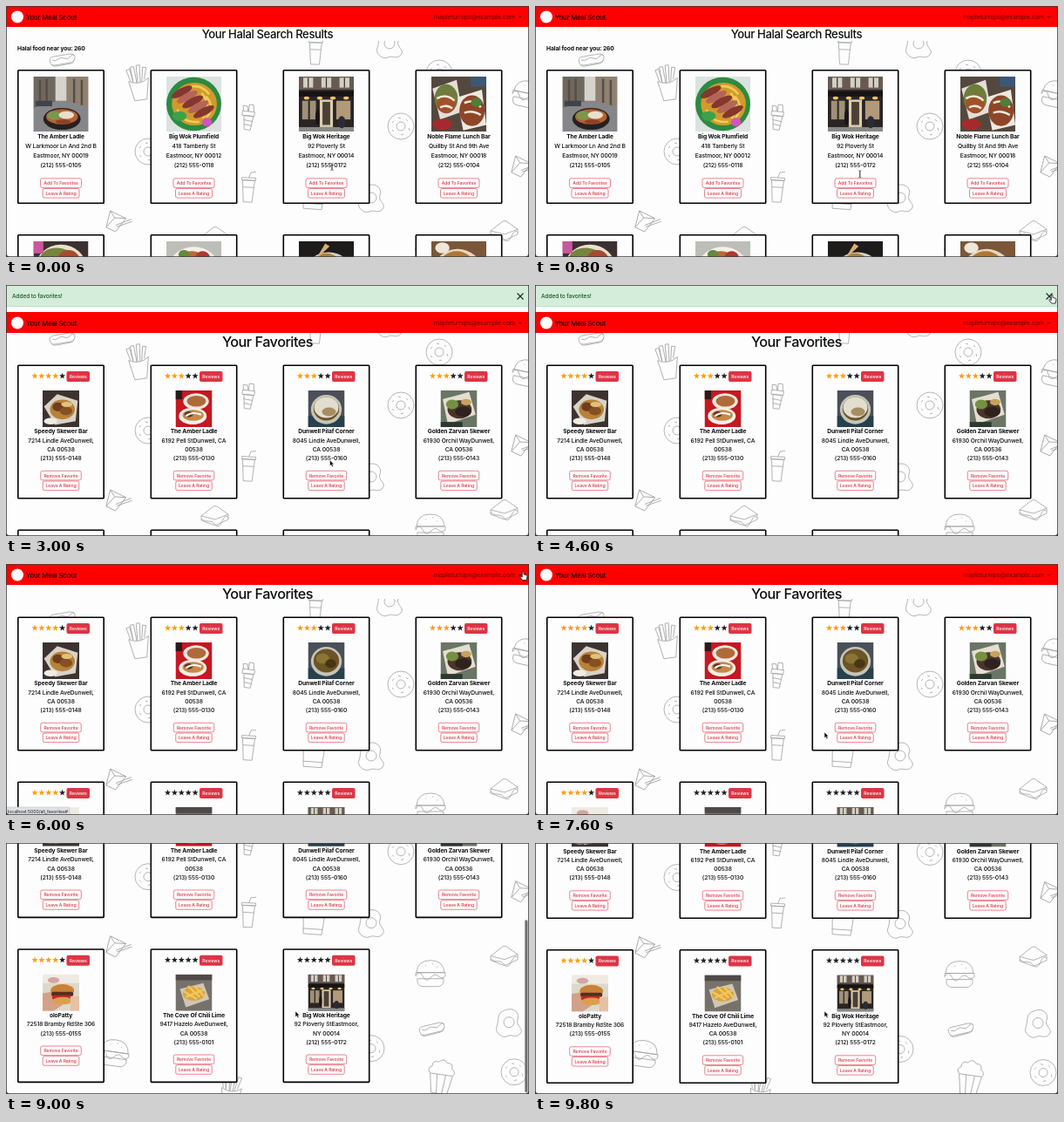
Recreate the animation shown at these times as an HTML page. Size 600 px wide and 288 px high, loop 9.9 s.

```html
<!DOCTYPE html>
<html lang="en">
<head>
<meta charset="utf-8">
<title>Restaurant favorites</title>
<style>
html, body { margin: 0; width: 100%; height: 100%; overflow: hidden; background: #fff; }
svg { display: block; }
#stage { width: 600px; height: 288px; font-family: Inter, "Liberation Sans", sans-serif; }
text { letter-spacing: -.018em; }
.heading { letter-spacing: -.03em; }
</style>
</head>
<body>
<svg id="stage" viewBox="0 0 600 288" xmlns="http://www.w3.org/2000/svg"></svg>
<script>
const LOOP = 9900, STEP = 100;
const RED = '#dc3545', INK = '#0c0e10', PAPER = '#fdfdfd';
const COLS = [13, 165.5, 317.5, 469.5];
const CARD_W = 100, CARD_H = 154, ROW = 189;

// Drawing helpers
const rect = (x, y, w, h, fill, more = '') =>
  `<rect x="${x}" y="${y}" width="${w}" height="${h}" fill="${fill}" ${more}/>`;
const oval = (x, y, rx, ry, fill, more = '') =>
  `<ellipse cx="${x}" cy="${y}" rx="${rx}" ry="${ry}" fill="${fill}" ${more}/>`;
const path = (d, fill, more = '') => `<path d="${d}" fill="${fill}" ${more}/>`;
const group = (x, y, body) => `<g transform="translate(${x} ${y})">${body}</g>`;
const text = (x, y, str, size, { weight = 450, fill = INK, anchor = 'middle', cls = '' } = {}) =>
  `<text class="${cls}" x="${x}" y="${y + size * .36}" font-size="${size}" font-weight="${weight}" fill="${fill}" text-anchor="${anchor}">${str}</text>`;

// Line-art background
const ART = {
  hotdog: 'M-14 3q-3-6 4-7l18-3q7 0 6 5t-5 5l-18 3q-5 0-5-3zM-12 0q4 2 7-1t7-1 7-2 5-1M-13 5q1 3 6 2l16-3q4-1 4-4',
  fries: 'M-11-3l4 23h14l5-24q-11 8-23 1zM-9-3l-3-13 4-1 2 15M-6-1l-1-18h4l1 19M-1 0l1-20h4l-2 20M4-1l3-16 4 1-4 13',
  sundae: 'M-5 1l2 16h7l2-16zM-7-4h14v5h-14zM-6-4l-1-6h5l1 6M0-4v-8h5l1 8M-5 6l10 1M-4 11l9 1',
  drink: 'M-7-9l2 25h10l2-25zM-8-12h16v3h-16zM0-12l2-6 6-1M-6-1h12',
  cup: 'M-13-18l2 32h21l3-32zM-12 8h23',
  donut: 'M-15 0a15 15 0 1 0 30 0a15 15 0 1 0-30 0M-5 0a5 5 0 1 0 10 0a5 5 0 1 0-10 0M-10-4l2-2M-3-10l3 1M6-8l2 2M9 2l1 3M3 9l-3 1M-8 6l-2-2',
  egg: 'M-4-15c10-4 17 4 14 11s8 10 3 16-10 0-15 3-15-4-12-11-1-16 10-19zM-6-1a6 6 0 1 0 12 0a6 6 0 1 0-12 0',
  box: 'M-11-8h20l-4 19h-12zM-11-8l8 5 12-5M-3-3l-4 14M2 4l13-14M4 5l13-13',
  sandwich: 'M-16 0l14-11q2-1 4 0l13 9-15 6zM-16 0v5l16 6 15-7v-6M-16 3q4 4 8 3t8 4 8-4 7-4',
  burger: 'M-16-2q1-14 16-14t16 14zM-17-2h34v4q-4 4-8 0t-9 2-9-2-8 0zM-15 5h30v4q-2 5-7 5h-16q-6 0-7-5zM-6-10h1M2-12h1M7-8h1',
  popcorn: 'M-13-4l4 22h18l4-22zM-5-4l2 22M5-4l-2 22M-13-4q-5-6 1-8 0-8 7-6 5-6 10 0 7-1 6 6 6 4 2 8'
};
const DOODLES = [
  ['hotdog', 65, 62], ['fries', 152, 88, -8], ['sundae', 278, 125, 6], ['drink', 278, 209, 3],
  ['donut', 453, 138], ['donut', 163, 167], ['egg', 419, 221], ['box', 126, 247, 26],
  ['sandwich', 240, 265], ['sandwich', 572, 258], ['burger', 487, 279], ['cup', 353, 219, 4],
  ['drink', 355, 51, 2], ['egg', 440, 44], ['donut', 497, 77], ['burger', 598, 102, 12],
  ['box', 591, 184, 26], ['hotdog', 489, 342, -4], ['burger', 124, 370, 8], ['egg', 577, 335],
  ['popcorn', 499, 398, 8], ['fries', 258, 413, 6], ['donut', 419, 364], ['donut', 583, 391]
];
const doodles = '<g fill="none" stroke="#a2a2a2" stroke-width=".8" clip-path="url(#below)">' +
  DOODLES.map(([k, x, y, a = 0]) =>
    `<path d="${ART[k]}" transform="translate(${x} ${y}) rotate(${a})"/>`).join('') + '</g>';

// Simplified pictures on a 100 x 100 square
const PICS = {
  street: rect(0, 0, 100, 100, '#8a857f') + rect(38, 0, 24, 44, '#d6d3ce') +
    path('M0 0h40v46L0 58z', '#6f685f') + path('M60 0h40v58L60 46z', '#8f8272') +
    path('M12 6v44M24 4v44M74 4v44M88 6v46', 'none', 'stroke="#574f47" stroke-width="4"') +
    path('M0 57l36-11h30l34 12v42H0z', '#85868a') + rect(4, 44, 30, 10, '#40444a') +
    oval(52, 77, 34, 20, '#272021') + oval(52, 73, 29, 14, '#b8622f') +
    oval(38, 71, 13, 8, '#7c9650') + oval(60, 70, 14, 7, '#eadfcb') + oval(54, 82, 14, 4, '#8f3f28'),
  steak: rect(0, 0, 100, 100, '#dbe2df') + oval(50, 50, 50, 49, '#2c8a42') + oval(51, 50, 41, 39, '#d29a2c') +
    path('M30 24q30-16 48 8M20 60q10 26 40 22M72 36q18 20 0 40M64 30q20 24 2 46', 'none', 'stroke="#f0cb57" stroke-width="4"') +
    [0, 1, 2, 3, 4].map(i => oval(28 + i * 10, 28 + i * 9, 21, 7, i % 2 ? '#b5645a' : '#83372f', `transform="rotate(-28 ${28 + i * 10} ${28 + i * 9})"`)).join('') +
    oval(24, 72, 13, 9, '#3fa04c') + oval(74, 83, 9, 8, '#d454bd'),
  shop: rect(0, 0, 100, 100, '#2a2423') + rect(0, 0, 100, 24, '#685a50') +
    [8, 41, 74].map(x => rect(x, 2, 18, 18, '#d2cfc4') + rect(x + 8, 2, 2, 18, '#39302c')).join('') +
    rect(0, 27, 100, 9, '#171416') + [14, 38, 62, 86].map(x => oval(x, 39, 5, 3, '#f3c36c')).join('') +
    rect(6, 44, 25, 34, '#a09078') + rect(68, 44, 26, 34, '#b09a7a') + rect(38, 42, 24, 50, '#dccdb0') +
    rect(43, 46, 14, 42, '#4c4036') + rect(0, 92, 100, 8, '#8b8987') + oval(78, 83, 7, 11, '#292c35') +
    rect(17, 44, 3, 34, '#2a2423') + oval(34, 74, 4, 15, '#181618'),
  trays: rect(0, 0, 100, 100, '#54483e') + path('M2 22l44-16 10 58-40 14z', '#e4ded6') + path('M46 38l46-14 8 64-42 10z', '#eee9e2') +
    oval(27, 40, 21, 26, '#6d7d3c') + oval(74, 62, 23, 28, '#8f4528') + oval(27, 50, 17, 17, '#a2502c') +
    path('M10 40q18-10 32 4M60 48q18-8 30 8M60 66q14-6 30 4M16 56q12-6 22 2', 'none', 'stroke="#f7ead9" stroke-width="4"') +
    oval(82, 47, 10, 8, '#4f7f36') + oval(20, 87, 18, 10, '#a52a2b') + rect(72, 0, 28, 18, '#3b5878'),
  salad: rect(0, 0, 100, 100, '#3d3130') + oval(50, 48, 46, 42, '#e8e1d0') + oval(42, 32, 30, 20, '#77843c') + oval(64, 40, 22, 24, '#a84a30') + rect(0, 0, 18, 22, '#c9579f'),
  wrap: rect(0, 0, 100, 100, '#bdbeb8') + oval(50, 50, 46, 40, '#f3f0ea') + oval(46, 36, 24, 18, '#b96a35') + oval(66, 30, 13, 12, '#b23630') + oval(32, 24, 10, 8, '#66883c'),
  bread: rect(0, 0, 100, 100, '#1d1c1a') + oval(54, 56, 42, 36, '#d3d3c8') + oval(50, 48, 28, 26, '#b37d38') + path('M30 34L48 4l8 5z', '#dcae70'),
  platter: rect(0, 0, 100, 100, '#7b5638') + oval(48, 52, 43, 38, '#e5d8c2') + oval(46, 42, 30, 24, '#b07632') + oval(20, 12, 13, 10, '#eee6d8'),
  foam: rect(0, 0, 100, 100, '#3c3330') + path('M4 44L40 10l56 18-6 56-56 10z', '#d9d2c7') + oval(54, 52, 34, 27, '#b78138') +
    oval(42, 45, 15, 12, '#713d1c') + oval(64, 56, 17, 12, '#855024') + oval(66, 38, 15, 7, '#e1c27b') + oval(22, 84, 18, 9, '#f0ece4'),
  feast: rect(0, 0, 100, 100, '#c51820') + oval(56, 30, 35, 22, '#efe6de') + oval(57, 29, 26, 15, '#ad6b3a') +
    oval(47, 70, 38, 23, '#f3eee7') + oval(48, 68, 29, 15, '#c48a48') + oval(36, 65, 12, 8, '#6d3525') +
    path('M28 70q18-14 42-4', 'none', 'stroke="#fff" stroke-width="5"') + rect(0, 0, 18, 24, '#271b1c'),
  curry: rect(0, 0, 100, 100, '#4a5058') + rect(0, 70, 100, 30, '#27414d') + oval(50, 52, 42, 40, '#c6c4b7') +
    oval(50, 50, 35, 32, '#6b5426') + oval(40, 44, 18, 14, '#8b7434') + oval(62, 58, 15, 12, '#473515'),
  grill: rect(0, 0, 100, 100, '#6b7565') + path('M6 24L78 4l18 62-76 26z', '#e3ded2') + oval(52, 52, 33, 25, '#49352c') +
    oval(32, 38, 17, 13, '#75903f') + oval(62, 58, 22, 14, '#2f211d') + oval(70, 32, 14, 9, '#c7a25c') + rect(0, 86, 60, 14, '#2d3830'),
  patty: rect(0, 0, 100, 100, '#ddd8c8') + rect(0, 0, 100, 24, '#efebe3') + oval(30, 16, 16, 8, '#d5a4a0') +
    path('M0 52l34-6 22 36-26 18H0z', '#d2a187') + oval(54, 44, 32, 17, '#c98237') + rect(24, 48, 60, 12, '#51301f', 'rx="5"') +
    rect(26, 57, 56, 12, '#c3252a', 'rx="5"') + oval(55, 72, 28, 10, '#dc9f4b') + rect(76, 60, 24, 40, '#e6c0a4'),
  chips: rect(0, 0, 100, 100, '#77716c') + path('M12 40l64-16 16 44-64 22z', '#cfc6b4') + oval(50, 53, 30, 19, '#dca23b') +
    path('M22 46l36 22M34 32l32 30M28 62l48-20M52 32l26 28', 'none', 'stroke="#f0c65f" stroke-width="6"') + rect(0, 0, 100, 16, '#4f4a47')
};
const pic = (kind, x, y, size) =>
  `<svg x="${x}" y="${y}" width="${size}" height="${size}" viewBox="0 0 100 100">${PICS[kind]}</svg>`;

// Page parts
const outlineBtn = (x, y, w, label, id = '') =>
  rect(x - w / 2, y, w, 10.6, PAPER, `rx="2" stroke="${RED}" stroke-width=".6"`) +
  `<g ${id}>${text(x, y + 5.5, label, 5.1, { fill: RED })}</g>`;
const frame = () => rect(.8, .8, CARD_W - 1.6, CARD_H - 1.6, PAPER, 'rx=".8" stroke="#000" stroke-width="1.6"');

const nav = () => rect(0, 0, 600, 24, '#f00') + oval(13, 12.5, 7, 7, '#fff') +
  text(23, 13, 'Your Meal Scout', 7.7, { anchor: 'start', fill: '#1a0000' }) +
  text(584, 12.8, 'mapleturnips@example.com', 7.05, { anchor: 'end', fill: '#7d0000' }) +
  path('M587.5 11.7h4.4l-2.2 2.4z', '#7d0000');

function resultCard([name, street, city, phone, kind], i) {
  const mid = CARD_W / 2;
  return group(COLS[i % 4], 73 + ROW * (i > 3), frame() + pic(kind, 18.5, 8, 63) +
    text(mid, 76.5, name, 6.7, { weight: 700 }) +
    [street, city, phone].map((s, n) => text(mid, 87.6 + n * 11, s, 6.75)).join('') +
    outlineBtn(mid, 124.8, 47, 'Add To Favorites', i === 2 ? 'id="add"' : '') +
    outlineBtn(mid, 136.5, 42, 'Leave A Rating'));
}

const star = (x, y, fill) => {
  const pts = Array.from({ length: 10 }, (_, i) => {
    const r = i % 2 ? 1.6 : 3.7, a = i * Math.PI / 5;
    return `${(x + r * Math.sin(a)).toFixed(2)},${(y - r * Math.cos(a)).toFixed(2)}`;
  });
  return `<polygon points="${pts.join(' ')}" fill="${fill}"/>`;
};

function favoriteCard([name, lines, kind, stars], i) {
  const mid = CARD_W / 2, btnY = 101 + (lines.length - 1) * 10;
  return group(COLS[i % 4], 60.5 + ROW * (i > 3), frame() +
    [0, 1, 2, 3, 4].map(n => star(20 + n * 7.9, 13, n < stars ? '#ff9d0a' : '#1d2024')).join('') +
    rect(56.5, 7.5, 26.5, 12, RED, 'rx="2"') + text(69.8, 13.6, 'Reviews', 5.2, { fill: '#fff' }) +
    pic(kind, 29, 29.5, 42) + (i === 2 ? `<g id="rice">${oval(50, 49, 14, 12, '#e2ddcf')}${oval(53, 54, 8, 5, '#a68d62')}</g>` : '') +
    text(mid, 76.5, name, 6.7, { weight: 700 }) +
    lines.map((s, n) => text(mid, 86.8 + n * 10.1, s, 6.75)).join('') +
    outlineBtn(mid, btnY + .8, 46.5, 'Remove Favorite') + outlineBtn(mid, btnY + 12.5, 41.5, 'Leave A Rating'));
}

const RESULTS = [
  ['The Amber Ladle', 'W Larkmoor Ln And 2nd B', 'Eastmoor, NY 00019', '(212) 555-0105', 'street'],
  ['Big Wok Plumfield', '418 Tamberly St', 'Eastmoor, NY 00012', '(212) 555-0118', 'steak'],
  ['Big Wok Heritage', '92 Ploverly St', 'Eastmoor, NY 00014', '(212) 555-0172', 'shop'],
  ['Noble Flame Lunch Bar', 'Quillby St And 9th Ave', 'Eastmoor, NY 00018', '(212) 555-0104', 'trays'],
  ['', '', '', '', 'salad'], ['', '', '', '', 'wrap'], ['', '', '', '', 'bread'], ['', '', '', '', 'platter']
];
const FAVORITES = [
  ['Speedy Skewer Bar', ['7214 Lindle AveDunwell,', 'CA 00538', '(213) 555-0148'], 'foam', 4],
  ['The Amber Ladle', ['6192 Pell StDunwell, CA', '00538', '(213) 555-0130'], 'feast', 3],
  ['Dunwell Pilaf Corner', ['8045 Lindle AveDunwell,', 'CA 00538', '(213) 555-0160'], 'curry', 3],
  ['Golden Zarvan Skewer', ['61930 Orchil WayDunwell,', 'CA 00536', '(213) 555-0143'], 'grill', 3],
  ['oloPatty', ['72518 Bramby RdSte 306', '(213) 555-0155'], 'patty', 4],
  ['The Cove Of Chili Lime', ['9417 Hazelo AveDunwell,', 'CA 00538', '(213) 555-0101'], 'chips', 0],
  ['Big Wok Heritage', ['92 Ploverly StEastmoor,', 'NY 00014', '(212) 555-0172'], 'shop', 0]
];

const results = doodles + nav() +
  text(300, 32.3, 'Your Halal Search Results', 13.1, { weight: 500, cls: 'heading' }) +
  text(13, 48.3, 'Halal food near you: 260', 6.75, { weight: 700, anchor: 'start' }) +
  RESULTS.map(resultCard).join('');

const alertBar = rect(0, 0, 600, 24.5, '#d4edda', 'stroke="#b9dcc3" stroke-width=".8"') +
  text(7, 13, 'Added to favorites!', 6.6, { anchor: 'start', fill: '#155724' }) +
  path('M586.5 9.5l7 7m0-7l-7 7', 'none', 'stroke="#16281c" stroke-width="1.1"');

const favorites = doodles + `<g id="alert">${alertBar}</g><g id="content">` + nav() +
  text(300, 34.5, 'Your Favorites', 16.2, { weight: 500, cls: 'heading' }) +
  FAVORITES.map(favoriteCard).join('') + '</g>';

const cursors = {
  beam: path('M-1.6-4q1.6 0 1.6 1v6q0 1-1.6 1M1.6-4Q0-4 0-3v6q0 1 1.6 1', 'none', 'stroke="#333" stroke-width=".7"'),
  arrow: path('M0 0v6.6l1.6-1.4 1.1 2.5 1.3-.6-1.1-2.4h2z', '#000', 'stroke="#fff" stroke-width=".5"'),
  hand: path('M-.8-4q1-1 1.6 0l.3 3 3 .8q1 .4.8 1.8l-.8 4h-4.4l-2.8-3.6q-.2-1.4 1.2-.8l1.1.8z', '#fff', 'stroke="#111" stroke-width=".8"')
};

const stage = document.getElementById('stage');
stage.innerHTML = `<clipPath id="below">${rect(0, 40, 600, 400, '#000')}</clipPath>` + rect(0, 0, 600, 288, PAPER) +
  `<g id="results">${results}</g><g id="favorites">${favorites}</g>` +
  rect(595.3, 0, 3.2, 198, '#6f6f6f', 'rx="1.6" id="thumb"') +
  `<g id="status">${rect(-2, 279, 75, 11, '#dfe1e5', 'rx="1.5" stroke="#b9bbbe" stroke-width=".5"')}` +
  text(2, 284, 'localhost:5000/all_favorites#', 5.15, { anchor: 'start', fill: '#33363a' }) + '</g>' +
  path('M0 0H600V288H0zM.8.8V284q0 3.2 3.2 3.2H596q3.2 0 3.2-3.2V.8z', '#3c3c3c', 'fill-rule="evenodd"') +
  '<g id="pointer">' + Object.keys(cursors).map(k => `<g id="${k}">${cursors[k]}</g>`).join('') + '</g>';

const el = id => document.getElementById(id);
const show = (id, on) => el(id).setAttribute('visibility', on ? 'inherit' : 'hidden');
const fade = (id, v) => el(id).setAttribute('opacity', v);
const move = (id, x, y) => el(id).setAttribute('transform', `translate(${x} ${y})`);

// Tracks hold [time, value] pairs
const smooth = p => p * p * (3 - 2 * p);
const linear = p => p;
function at(track, t, ease = smooth) {
  const i = track.findIndex(k => k[0] > t);
  if (i < 0) return track[track.length - 1][1];
  if (i === 0) return track[0][1];
  const [t0, a] = track[i - 1], [t1, b] = track[i];
  return a + (b - a) * ease((t - t0) / (t1 - t0));
}

const POINTER_X = [[0, 374], [500, 374], [1100, 371.5], [3000, 371.5], [4200, 593], [6200, 593], [7000, 332]];
const POINTER_Y = [[0, 184.5], [500, 184.5], [1100, 201], [3000, 201], [4200, 15.5], [5300, 15.5], [5800, 13], [6200, 13], [7000, 193]];
const SCROLL = [[7700, 0], [7900, 12], [8100, 42], [8300, 71], [8500, 97], [8700, 116], [9000, 128.3], [9400, 127.5]];
const THUMB = [[7600, 0], [7800, 1], [9200, 1], [9600, 0]];
const LOADED = 2500, CLOSE = 5300, CLOSED = 5500;

function draw(t) {
  const onResults = t < LOADED, scroll = at(SCROLL, t, linear);
  show('results', onResults);
  show('favorites', !onResults);
  show('add', onResults && t < 1200);
  fade('alert', at([[CLOSE, 1], [CLOSED, 0]], t, linear));
  move('content', 0, t < CLOSED ? 31 : 0);
  show('rice', !onResults && t < CLOSED);
  move('favorites', 0, -scroll);
  el('thumb').setAttribute('y', scroll * 198 / 288);
  fade('thumb', at(THUMB, t, linear));
  show('status', t >= CLOSED && t < 6300);

  const kind = t < 900 ? 'beam' : t >= 4000 && t < 6300 ? 'hand' : 'arrow';
  for (const k in cursors) show(k, k === kind);
  move('pointer', at(POINTER_X, t), at(POINTER_Y, t));
}

const start = performance.now();
function tick() {
  const t = (performance.now() - start) % LOOP;
  draw(Math.floor(t / STEP) * STEP);
  requestAnimationFrame(tick);
}
tick();
</script>
</body>
</html>
```
